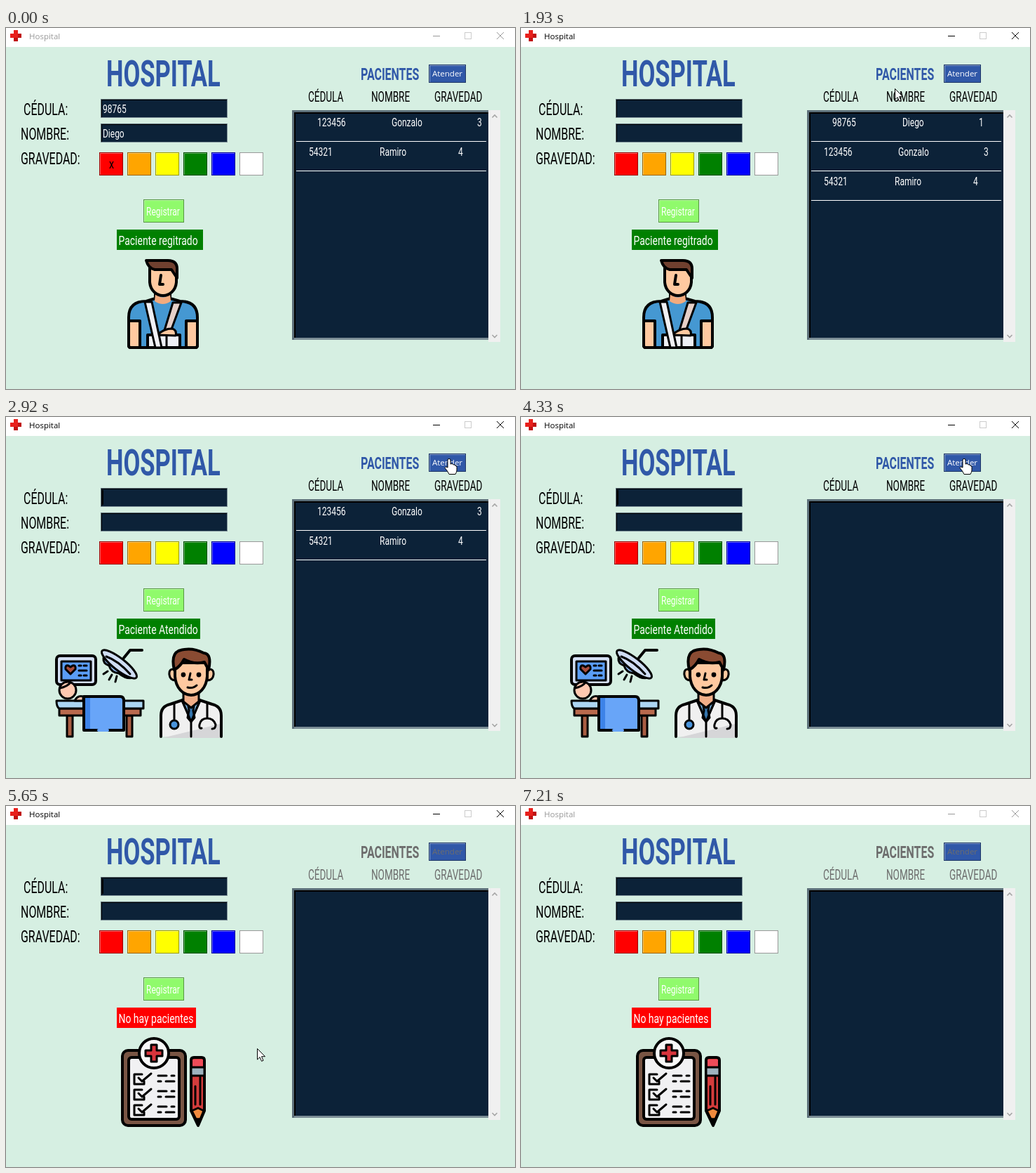
An HTML page that plays this animation: 726x514 px, repeating every 7.3 s.

```html
<!DOCTYPE html>
<html lang="es">
<head>
<meta charset="utf-8">
<title>Hospital</title>
<style>
  html, body { margin: 0; width: 100%; height: 100%; overflow: hidden; background: #d6efe2; }
  svg { display: block; width: 100vw; height: 100vh; }
  text { font-family: Roboto, 'Noto Sans', sans-serif; white-space: pre; }
  .caps, .body { transform-box: fill-box; transform-origin: 0 0; }
  .caps { transform: scaleX(.665); }
  .body { transform: scaleX(.75); font-size: 16px; }
  .ui { font: 11.5px 'Open Sans', 'Noto Sans', sans-serif; }
  .light { fill: #fff; }
  .icon { stroke: #000; stroke-width: 4; stroke-linejoin: round; stroke-linecap: round; }
  .thin { stroke-width: 3; }
  .line { fill: none; }
</style>
</head>
<body>
<svg viewBox="0 0 726 514">
  <rect width="726" height="514" fill="#d6efe2"/>

  <!-- title bar -->
  <rect width="726" height="27" fill="#fff"/>
  <path d="M11 3h6v5h5v6h-5v5h-6v-5H6V8h5z" fill="#e8201c"/>
  <path d="M11 14h6v5h-6zM17 8h5v6h-5z" fill="#c01212"/>
  <rect id="hot" x="683" width="43" height="26" fill="#e81123"/>
  <g id="bar">
    <text class="ui" x="33" y="16">Hospital</text>
    <path d="M609 11.5h10M700 6l10 10M710 6l-10 10" fill="none" stroke="currentColor"/>
  </g>
  <rect x="654.5" y="6.5" width="9" height="9" fill="none" stroke="#ccc"/>

  <!-- form -->
  <text class="caps" x="143" y="83" font-size="52" font-weight="700" fill="#3058a8">HOSPITAL</text>
  <text class="caps" x="25" y="124" font-size="24">CÉDULA:</text>
  <text class="caps" x="21" y="159" font-size="24">NOMBRE:</text>
  <text class="caps" x="21" y="194" font-size="24">GRAVEDAD:</text>
  <g id="boxes"></g>
  <g data-on="0 1110">
    <text class="body light" x="138" y="121">98765</text>
    <text class="body light" x="138" y="156">Diego</text>
    <text class="body" x="147" y="200" style="font-size:19px">x</text>
  </g>
  <rect data-on="1980 2620 2920 3550 3780 4400 4720 5310 5590 6210 6490 7130" x="137" y="104" width="2" height="21"/>
  <rect data-on="890 1110" x="197" y="245" width="56" height="31" fill="#f0f0f0"/>
  <text class="body light" x="200" y="267" data-on="0 890 1110 7300">Registrar</text>
  <text class="body" x="200" y="267" data-on="890 1110">Registrar</text>

  <!-- patient list -->
  <g id="heads">
    <text class="caps" id="listTitle" x="506" y="74" font-size="24" font-weight="700">PACIENTES</text>
    <text class="caps" x="431" y="105" font-size="20.3">CÉDULA</text>
    <text class="caps" x="521" y="105" font-size="20.3">NOMBRE</text>
    <text class="caps" x="611" y="105" font-size="20.3">GRAVEDAD</text>
  </g>
  <rect data-on="3380 3550 4160 4330 4720 4950" x="604" y="53" width="51" height="24" fill="#f0f0f0"/>
  <text class="ui" id="attend" x="608" y="69">Atender</text>
  <rect x="408" y="117" width="280" height="327" fill="#7b8d95"/>
  <path d="M408 117h280v3H411v324h-3z" fill="#5c6f79"/>
  <rect x="411" y="120" width="277" height="321"/>
  <rect x="413" y="122" width="275" height="319" fill="#0c2238"/>
  <rect x="688" y="117" width="17" height="330" fill="#f0f0f0"/>
  <path d="M693.5 127.5l3.5-3.5 3.5 3.5M693.5 437l3.5 3.5 3.5-3.5" fill="none" stroke="#a6a6a6" stroke-width="1.6"/>
  <g id="rows"></g>

  <!-- messages -->
  <g id="notes"></g>

  <!-- injured patient -->
  <g class="icon" data-on="0 2920">
    <path d="M175 452V412Q175 389 200 389L213 385V374H234V385L248 389Q273 389 273 412V452Q273 455 270 455H178Q175 455 175 452Z" fill="#4598d2"/>
    <path d="M175 417H191V455H178Q175 455 175 452ZM257 417H273V452Q273 455 270 455H257Z" fill="#ffc9a0"/>
    <path d="M213 378Q224 389 234 378L235 389Q224 397 212 389Z" fill="#f3ab7e" stroke="none"/>
    <path d="M205 342V362C206 374 215 381 224 381S242 374 243 362V342Z" fill="#ffc9a0"/>
    <path d="M200 331H231Q244 331 244 343V356L236 344H212Q203 342 200 331Z" fill="#70402f"/>
    <path class="line" d="M221 352L219 365H224"/>
    <path d="M238 391H250L233 437H224Z" fill="#e6d0c8" class="thin"/>
    <path d="M202 437H248V455H202Z" fill="#eef0f5"/>
    <path d="M216 437Q225 428 237 428Q244 430 242 438Z" fill="#ffc9a0" class="thin"/>
    <path d="M198 390H208L222 455H213Z" fill="#f0f0f4" class="thin"/>
    <path class="line thin" d="M229 438V455"/>
  </g>

  <!-- operating room and doctor -->
  <g class="icon" data-on="2920 4950">
    <rect x="72" y="340" width="56" height="41" rx="5" fill="#d3def2"/>
    <rect x="79" y="348" width="42" height="27" fill="#5a9df5" class="thin"/>
    <path d="M92 366L85 359Q84 353 89 354L92 356L95 354Q100 353 99 359Z" fill="#a94e3e" class="thin"/>
    <path class="line thin" d="M104 354h3M111 354h4M104 361h11M104 368h3M111 368h4"/>
    <path class="line" d="M194 332H177L168 343"/>
    <path d="M139 343Q138 351 147 354Q150 364 161 365Q172 374 182 371Z" fill="#8fb8ee" class="thin"/>
    <ellipse cx="161.500" cy="352" rx="31" ry="8.500" transform="rotate(38 161.500 352)" fill="#cfddf4" class="thin"/>
    <path class="line thin" d="M143 341Q160 347 177 366M145 362l-6 4M151 367l-4 7M158 369l-2 8"/>
    <path d="M87 425h8v30h-8zM172 425h8v30h-8z" fill="#a95d42" class="thin"/>
    <path d="M76 415H192V425H76Z" fill="#b96a4d" class="thin"/>
    <path d="M72 404H196V415H76Q72 413 72 404Z" fill="#acd5f3" class="thin"/>
    <path d="M98 404Q102 396 110 398V404Z" fill="#ffc9b0" class="thin"/>
    <circle cx="88" cy="389" r="12" fill="#ffc9b0" class="thin"/>
    <path class="line thin" d="M77 386Q87 384 92 378"/>
    <path d="M111 398H163Q168 398 168 404V446H111Z" fill="#68a5f8"/>
    <path d="M113 400H120V444H113Z" fill="#3d83e8" stroke="none"/>
    <path d="M132 446h13" stroke="#68a5f8"/>

    <path d="M221 455V425Q221 412 234 409L252 403H276L294 409Q307 412 307 425V455" fill="#f0f0f0"/>
    <path d="M223 457L305 437V457Z" fill="#d6d6d8" stroke="none"/>
    <path d="M251 404L264 433L277 404Z" fill="#7bb9e8" class="thin"/>
    <path d="M260 412h8l-1 6 2 10-5 6-5-6 2-10z" fill="#3475ad" class="thin"/>
    <path d="M253 389V405L264 414L275 405V389Z" fill="#f0ae88" class="thin"/>
    <path d="M240 359Q232 358 233 367Q234 375 242 375ZM288 359Q297 358 296 367Q295 375 287 375Z" fill="#ffc9a0" class="thin"/>
    <path d="M241 350H287V369C286 386 275 396 264 396S242 386 241 369Z" fill="#ffc9a0"/>
    <path d="M240 360Q235 338 246 333Q264 327 282 336Q294 337 289 360L283 349Q268 353 254 345Q249 355 240 360Z" fill="#8a4b32"/>
    <path class="line thin" d="M263 365l-2 9h4M259 385Q267 387 272 382"/>
    <circle cx="253" cy="367" r="1.4"/><circle cx="275" cy="367" r="1.4"/>
    <path class="line thin" d="M240 408V432M287 408V429M279 443Q275 444 276 438Q278 429 287 429T299 438Q299 444 294 444"/>
    <circle cx="240" cy="438" r="6" fill="#4a94dc" class="thin"/>
    <path class="line thin" d="M252 405L264 434V455M276 405L264 434"/>
  </g>

  <!-- clipboard -->
  <g class="icon" data-on="4950 7300">
    <rect x="166" y="348" width="90" height="107" rx="8" fill="#795544"/>
    <rect x="175" y="358" width="72" height="88" rx="4" fill="#f1f1f3"/>
    <circle cx="211" cy="352" r="21" fill="#f8f8f8"/>
    <path d="M207 340h8v8h8v8h-8v8h-8v-8h-8v-8h8z" fill="#d8343c" class="thin"/>
    <g id="checks" class="line thin"></g>
    <path d="M264 362Q264 358 268 358H279Q283 358 283 362V434L274 455L264 434Z" fill="#d43c3c"/>
    <path d="M266 361h15v11h-15z" fill="#f04b59" stroke="none"/>
    <path d="M264 372H283V384H264Z" fill="#9fb3bf" class="thin"/>
    <path d="M265 434L274 430L282 434L277 446H271Z" fill="#ef8a3d" class="thin"/>
    <path d="M271 446h6l-3 9z" class="thin"/>
    <path class="line thin" d="M270 399V425M277 386V425"/>
  </g>

  <g id="pointer">
    <circle data-on="890 1110 2690 2920 3380 3550 4160 4330 4720 4950" r="12" fill="#ff0" fill-opacity=".47"/>
    <path id="arrow" d="M.5.5V16L4 12.6L6.6 18.4L9 17.3L6.5 11.7H11.5Z" fill="#fff" stroke="#000"/>
    <path id="hand" d="M-1 2Q-1 .5 1 .5T3 2V8Q6 6.5 7 9Q9.500 8 10 10.500Q12 10 12 12.500V17Q12 19 10 22.500H1Q-1 18 -5 13.500Q-4 10.500 -1 13Z" fill="#fff" stroke="#000"/>
  </g>
</svg>
<script>
const LOOP = 7300, EMPTY = 4950;
const $ = id => document.getElementById(id);
const add = (id, html) => $(id).insertAdjacentHTML('beforeend', html);
const rect = (x, y, w, h, fill) =>
  `<rect x="${x}" y="${y}" width="${w}" height="${h}" style="fill:${fill}"/>`;
const words = (x, y, text, size = 16) =>
  `<text class="body light" x="${x}" y="${y}" style="font-size:${size}px">${text}</text>`;

// a button: dark outline, pale inner edge at the top left
function button(x, y, w, h, fill) {
  add('boxes', rect(x, y, w, h, `color-mix(in srgb, ${fill} 60%, #000)`) +
    rect(x + 1, y + 1, w - 2, h - 2, `color-mix(in srgb, ${fill} 60%, #fff)`) +
    rect(x + 2, y + 2, w - 3, h - 3, fill));
}
// an entry: sunken edge, black at the top left
function entry(x, y, w, h) {
  add('boxes', rect(x, y, w, h, '#7b8d95') + rect(x, y, w - 1, h - 1, '#5c6f79') +
    rect(x + 1, y + 1, w - 2, h - 2, '#000') + rect(x + 2, y + 2, w - 3, h - 3, '#0c2238'));
}
for (const y of [101, 136]) entry(135, y, 181, 27);
['#f00', '#ffa500', '#ff0', '#008000', '#00f', '#fff']
  .forEach((fill, i) => button(133 + 40 * i, 177, 34, 33, fill));
button(196, 244, 58, 33, '#90fa6c');
button(603, 52, 53, 26, '#3058a8');

// id, name, severity, and the columns of the last two
const diego = ['98765', 'Diego', 1, 532, 641];
const gonzalo = ['123456', 'Gonzalo', 3, 538, 660];
const ramiro = ['54321', 'Ramiro', 4, 533, 645];
function row([id, name, level, nameX, levelX], slot, on) {
  const shift = slot ? 0 : 12, y = 140 + 42 * slot;
  add('rows', `<g data-on="${on}">` + words(432 + shift, y, id) + words(nameX + shift, y, name) +
    words(levelX + shift, y, level) + rect(414, y + 21, 271, 1, '#fff') + '</g>');
}
row(gonzalo, 0, '0 1110 2920 3550');
row(ramiro, 1, '0 1110 2920 3550');
row(diego, 0, '1110 2920');
row(gonzalo, 1, '1110 2920');
row(ramiro, 2, '1110 2920');
row(ramiro, 0, '3550 4330');

const note = (text, width, fill, on) =>
  add('notes', `<g data-on="${on}">${rect(158, 287, width, 29, fill) + words(160.5, 309, text, 18.6)}</g>`);
note('Paciente regitrado', 123, '#008000', '0 2920');
note('Paciente Atendido', 119, '#008000', '2920 4950');
note('No hay pacientes', 113, '#f00', '4950 7300');

for (const y of [382, 404, 426]) {
  add('checks', `<path d="M194 ${y}H183V${y + 14}H197V${y + 10}M189 ${y + 5}l5 5L207 ${y - 1}` +
    `M217 ${y + 2}h12M236 ${y + 2}h4M217 ${y + 10}h4M228 ${y + 10}h12"/>`);
}

// pointer path: time, x, y
const path = [
  [350, 319, 376], [419, 319, 376], [420, 143, 330], [590, 143, 330], [740, 226, 267], [890, 226, 267],
  [1110, 226, 258], [1929, 226, 258], [1930, 532, 87], [2020, 620, 40], [2100, 700, 12], [2240, 702, 14],
  [2400, 660, 40], [2620, 631, 59], [5030, 631, 59], [5170, 615, 35], [5400, 450, 200], [5810, 300, 437],
  [6100, 705, 8], [6200, 704, 16], [6280, 701, 43], [6600, 653, 469], [6670, 645, 475], [6800, 600, 484],
  [6990, 572, 514]
];
function place(t) {
  const i = path.findIndex(p => p[0] > t);
  if (i < 1) return null;
  const [t0, x0, y0] = path[i - 1], [t1, x1, y1] = path[i], k = (t - t0) / (t1 - t0);
  return [x0 + (x1 - x0) * k, y0 + (y1 - y0) * k];
}
const inside = (p, x, y, w, h) => p && p[0] >= x && p[0] < x + w && p[1] >= y && p[1] < y + h;
const within = (t, times) => times.filter(s => s <= t).length % 2 === 1;
const show = (el, on) => el.style.display = on ? '' : 'none';

const timed = [...document.querySelectorAll('[data-on]')]
  .map(el => [el, el.dataset.on.split(' ').map(Number)]);

function draw(t) {
  for (const [el, times] of timed) show(el, within(t, times));

  const p = place(t), off = t >= EMPTY;
  const hand = inside(p, 196, 244, 58, 33) || (!off && inside(p, 603, 52, 53, 26));
  show($('pointer'), p);
  if (p) $('pointer').setAttribute('transform', `translate(${p.map(Math.round)})`);
  show($('hand'), hand);
  show($('arrow'), !hand);

  // the close button stays lit for a moment after the pointer leaves
  const onClose = q => inside(q, 683, 0, 43, 26);
  show($('hot'), onClose(p) || onClose(place(t - 100)));
  const tone = t >= 890 && t < 7130 ? '#000' : '#999';
  $('bar').style.color = $('bar').style.fill = tone;

  const pressed = within(t, [3380, 3550, 4160, 4330, 4720, 4950]);
  $('heads').style.fill = off ? '#6d6d6d' : '#000';
  $('listTitle').style.fill = off ? '#6d6d6d' : '#3058a8';
  $('attend').style.fill = off ? '#6d6d6d' : pressed ? '#000' : '#fff';
}

const start = performance.now();
function frame() {
  draw((performance.now() - start) % LOOP);
  requestAnimationFrame(frame);
}
frame();
</script>
</body>
</html>
```
